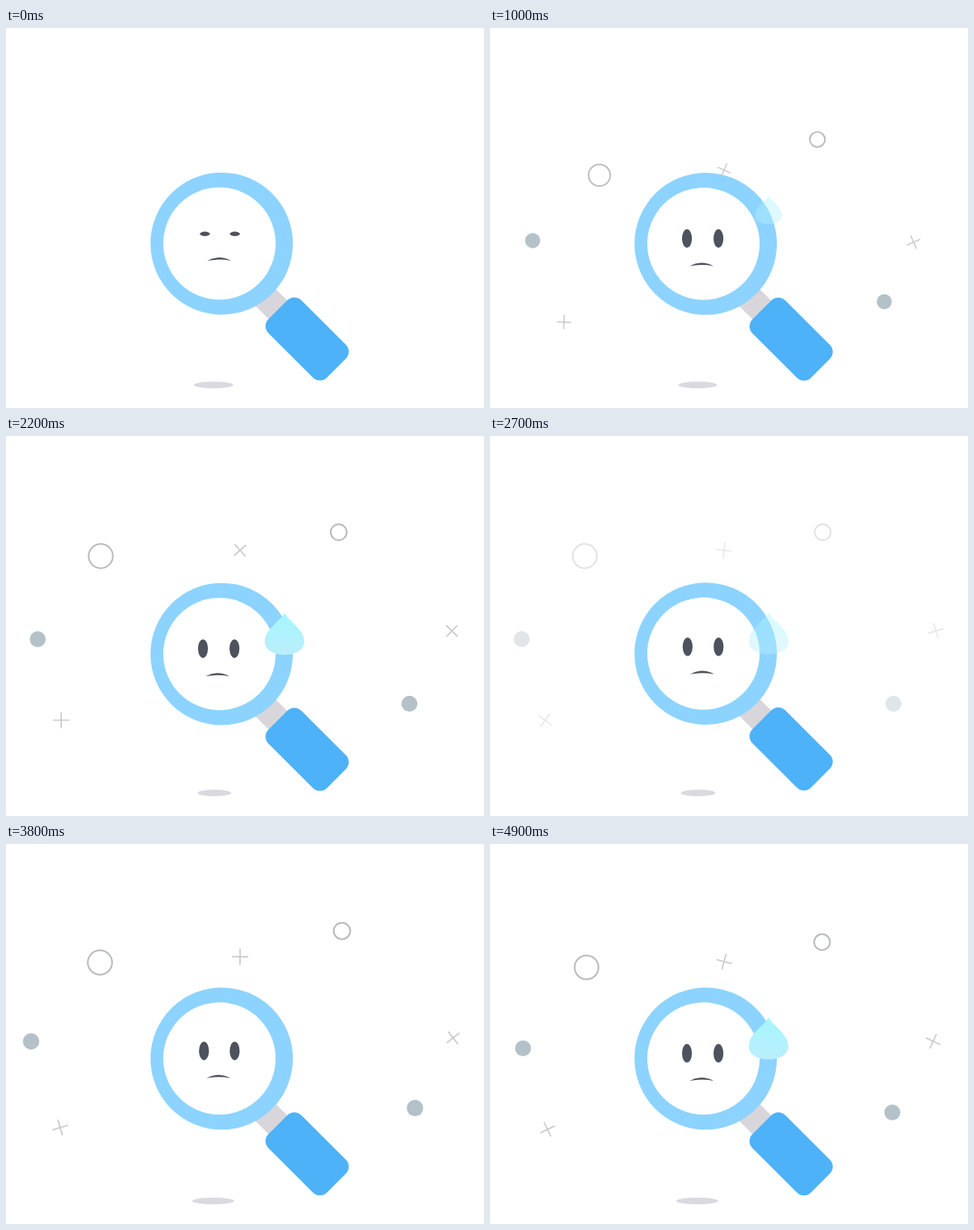
These frames come from a looping animation (580x462 px, 5000 ms). An HTML page:

```html
<!DOCTYPE html>
<html lang="en">
<head>
<meta charset="utf-8">
<title>Nothing found</title>
<style>
  html, body { margin: 0; width: 100%; height: 100%; overflow: hidden; background: #fff; }
  svg { display: block; width: 100%; height: 100%; }
</style>
</head>
<body>
<svg viewBox="0 0 580 462">
  <defs>
    <linearGradient id="water" x1="0" y1="0" x2="0" y2="1">
      <stop offset="0.2" stop-color="#a9f5ff"/>
      <stop offset="1" stop-color="#bbeefc"/>
    </linearGradient>
  </defs>
  <ellipse id="shadow" cy="434" ry="4" fill="#d9d9df"/>
  <g id="bits" fill="none" stroke-width="2"></g>
  <g id="glass">
    <g transform="translate(365.4 378) rotate(45)">
      <rect x="-82" y="-16" width="40" height="32" fill="#d8d6da"/>
      <rect x="-50.2" y="-28.2" width="100.4" height="56.4" rx="12" fill="#4db2f7"/>
    </g>
    <circle cx="261.7" cy="262.1" r="86.4" fill="#8dd3ff"/>
    <circle cx="259" cy="262" r="68.2" fill="#fff"/>
    <g fill="#4d525d">
      <ellipse id="eyeL" rx="6"/>
      <ellipse id="eyeR" rx="6"/>
      <path id="mouth" d="M-14.7 2Q0-6 14.7 2Q0-.8-14.7 2Z"/>
    </g>
    <path id="drop" fill="url(#water)" d="M0-34C5-24 24-14 24 1C24 11 14 17 0 17S-24 11-24 1C-24-14-5-24 0-34Z"/>
  </g>
</svg>
<script>
const LOOP = 5, CYCLE = 3.05;
const HUB = { x: 284, y: 460 };
const $ = id => document.getElementById(id);
const set = (el, attrs) => { for (const k in attrs) el.setAttribute(k, attrs[k]); };
const ramp = (t, a, b) => Math.min(1, Math.max(0, (t - a) / (b - a)));
const ease = p => (1 - Math.cos(Math.PI * p)) / 2;
const mix = (a, b, p) => a + (b - a) * p;

// Vertical float of the glass: [seconds, offset]
const FLOAT = [[0, 0], [.5, -.4], [1, .3], [1.5, 2.2], [2.2, 3], [3.1, 1.7],
               [3.8, -1.2], [4.35, -1.7], [4.9, -1.2], [5, -1]];

function spline(keys, t) {
  let i = 0;
  while (i < keys.length - 2 && t > keys[i + 1][0]) i++;
  const slope = n => {
    const a = keys[Math.max(0, n - 1)], b = keys[Math.min(keys.length - 1, n + 1)];
    return (b[1] - a[1]) / (b[0] - a[0]);
  };
  const [t0, v0] = keys[i], [t1, v1] = keys[i + 1];
  const h = t1 - t0, p = (t - t0) / h, q = 1 - p;
  return q * q * (1 + 2 * p) * v0 + p * p * (1 + 2 * q) * v1
    + h * p * q * (q * slope(i) - p * slope(i + 1));
}

// Burst out past full size, fall back, then settle at 1
function burst(t, peakAt, peak, dip) {
  if (t < peakAt) return peak * Math.sin(Math.PI / 2 * t / peakAt);
  if (t < 1) return mix(peak, dip, ease(ramp(t, peakAt, 1)));
  return mix(dip, 1, ease(ramp(t, 1, 2.1)));
}

const CROSS = "M-9.8 0H9.8M0-9.8V9.8";
const dot = (x, y) => ({ x, y, tag: "circle", look: { r: 9.7, fill: "#b4c1c9" } });
const hoop = (x, y, r, late) => ({ x, y, late, tag: "circle", look: { r, stroke: "#b9bbbd" } });
const cross = (x, y, spin, turn) => ({ x, y, spin, turn, late: true, tag: "path",
  look: { d: CROSS, stroke: "#c9c9cb", "stroke-width": 1.6 } });

const bits = [
  dot(38.5, 247), dot(489.5, 325.5), hoop(403.7, 117, 9.7), hoop(115, 146, 14.7, true),
  cross(284, 139, 95, -71), cross(541, 237, 57, -81), cross(67, 345.5, 73, -71)
];
for (const b of bits) {
  b.el = document.createElementNS("http://www.w3.org/2000/svg", b.tag);
  set(b.el, b.look);
  $("bits").append(b.el);
}

function draw(t) {
  const c = t % CYCLE;
  const dy = spline(FLOAT, t);
  set($("glass"), { transform: `translate(0 ${dy})` });
  set($("shadow"), { cx: 251.8 + .35 * dy, rx: 24 - 1.2 * dy });

  const away = 1 - ramp(c, 2.5, 2.85);
  const near = burst(c, .55, 1.095, .946), far = burst(c, .53, 1.098, .895);
  set($("bits"), { opacity: ramp(c, .06, .3) * away });
  for (const b of bits) {
    const s = b.late ? far : near;
    const x = mix(HUB.x, b.x, s), y = mix(HUB.y, b.y, s);
    const angle = b.spin ? b.spin * c + b.turn : 0;
    set(b.el, { transform: `translate(${x} ${y}) rotate(${angle}) scale(${s})` });
  }

  // Face sinks a little, and blinks as each cycle begins
  const sink = ease(ramp(c, .5, 1.02)) * (1 - ease(ramp(c, 2.5, 3)));
  const open = Math.max(ramp(c, 0, .05), 0) * (1 - ramp(c, CYCLE - .1, CYCLE));
  const eyeY = 250.3 + 5.3 * sink, ry = mix(2.5, 11.3, open);
  set($("eyeL"), { cx: 241.3 - 2.3 * sink, cy: eyeY, ry });
  set($("eyeR"), { cx: 277.7 - .5 * sink, cy: eyeY, ry });
  set($("mouth"), { transform: `translate(${258.7 - 1.9 * sink} ${281 + 6.2 * sink})` });

  const fall = ease(ramp(c, .8, 1.25));
  const size = mix(.45, 1, fall);
  set($("drop"), {
    transform: `translate(338 ${mix(213, 246, fall)}) scale(${size})`,
    opacity: ramp(c, .82, 1.25) * away
  });
}

function tick() {
  draw(performance.now() / 1000 % LOOP);
  requestAnimationFrame(tick);
}
draw(0);
requestAnimationFrame(tick);
</script>
</body>
</html>
```
